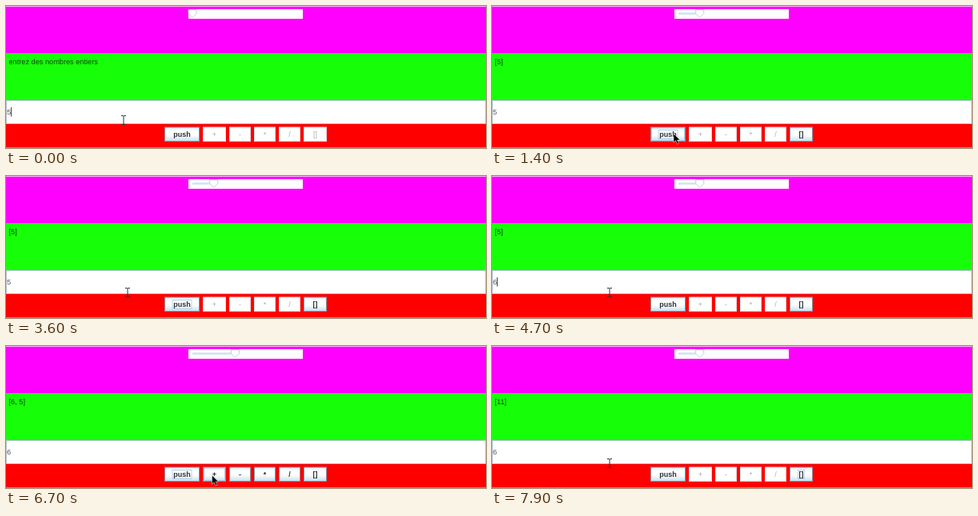
Recreate the animation shown at these times as an HTML page. Size 600 px wide and 178 px high, loop 8 s.

```html
<!DOCTYPE html>
<html lang="fr">
<head>
<meta charset="utf-8">
<title>Calculatrice à pile</title>
<style>
  html, body { margin: 0; width: 100%; height: 100%; overflow: hidden; background: #f00; }
  svg { display: block; width: 600px; height: 178px; }
  text { font-family: "Liberation Sans", Arial, sans-serif; }
  .stack { font-size: 9.2px; fill: #123f10; }
  .entry { font-size: 9.4px; fill: #555; }
  .btn text { font-size: 9px; font-weight: bold; fill: #2b333b; text-anchor: middle; }
  .btn .box { fill: url(#steel); stroke: #8796a5; }
  .btn .ring { fill: none; stroke: #b4cbe0; visibility: hidden; }
  .btn .focus { fill: none; stroke: #b3c8dd; stroke-width: .8; visibility: hidden; }
  .btn.off .box { fill: #fff; stroke: #e3dbe2; }
  .btn.off text { fill: #a9adb1; font-weight: normal; }
  .btn.hover .ring, .btn.focused .focus { visibility: visible; }
  .btn.down .box { fill: #cfe0ef; stroke: #71879c; }
</style>
</head>
<body>
<svg viewBox="0 0 600 178">
  <defs>
    <linearGradient id="steel" x2="0" y2="1">
      <stop offset="0" stop-color="#e6eef6"/>
      <stop offset=".3" stop-color="#fff"/>
      <stop offset=".55" stop-color="#fff"/>
      <stop offset="1" stop-color="#cbdceb"/>
    </linearGradient>
  </defs>
  <rect width="600" height="59" fill="#f0f"/>
  <rect width="600" height="1" fill="#f5b5f3"/>
  <rect y="59" width="600" height="60" fill="#16ff08"/>
  <rect y="148" width="600" height="30" fill="#f00"/>
  <rect y="177" width="600" height="1" fill="#f66"/>

  <rect x="228" y="4" width="143" height="12" fill="#fff"/>
  <path d="M233 9.5H366" stroke="#fafbfd" stroke-width="2"/>
  <path id="track" stroke="#cfe2f2" stroke-width="2.4"/>
  <path id="thumb" d="M-5 4.5H5V9.5L0 14.5L-5 9.5Z" fill="#fff" stroke="#bccad7" stroke-width=".9"/>

  <text id="stack" class="stack" x="3.5" y="72.5"></text>

  <rect x=".5" y="118.5" width="599" height="29" fill="#fff" stroke="#b3c1ce"/>
  <text id="entry" class="entry" x="1" y="136.3"></text>
  <path id="caret" d="M.5 127V138.5" stroke="#444"/>

  <g id="buttons"></g>

  <path id="arrow" d="M0 0V11L2.6 8.7L4.6 13.2L6.5 12.3L4.6 8.1H8Z" fill="#000" stroke="#fff" stroke-width=".5"/>
  <path id="beam" d="M-3 -5.5H-1L0 -4.7L1 -5.5H3M0 -4.7V4.7M-3 5.5H-1L0 4.7L1 5.5H3" fill="none" stroke="#333"/>
</svg>
<script>
const LOOP = 8000;
const $ = id => document.getElementById(id);

// label, left edge, width, stack size needed to enable it
const buttons = [
  ["push", 198, 44, 0], ["+", 246, 29, 2], ["-", 279, 27, 2],
  ["*", 310, 27, 2], ["/", 341, 27, 2], ["[]", 372, 29, 1]
].map(([label, x, w, need]) => {
  const mid = x + w / 2;
  const half = label === "push" ? 12 : 4;
  $("buttons").insertAdjacentHTML("beforeend", `<g class="btn">
    <rect class="box" x="${x + .5}" y="152" width="${w - 1}" height="17.5"/>
    <rect class="ring" x="${x + 1.5}" y="153" width="${w - 3}" height="15.5"/>
    <rect class="focus" x="${mid - half}" y="155.5" width="${2 * half}" height="11"/>
    <text x="${mid}" y="164.3">${label}</text></g>`);
  return { label, x, w, need, node: $("buttons").lastElementChild };
});

// Each step changes part of the state and holds until the next one
const steps = [
  [0, { x: 147, y: 143, entry: "5", stack: [], caret: true, focus: "entry", down: "" }],
  [500, { x: 158, y: 145, caret: false }],
  [600, { x: 184, y: 152 }],
  [700, { x: 216, y: 160 }],
  [800, { x: 249, y: 164 }],
  [900, { x: 238, y: 162 }],
  [1000, { x: 227, y: 160, caret: true }],
  [1200, { caret: false, focus: "push", down: "push" }],
  [1300, { stack: [5] }],
  [1400, { down: "" }],
  [3300, { x: 220, y: 159 }],
  [3400, { x: 200, y: 155 }],
  [3500, { x: 172, y: 149 }],
  [3600, { x: 152, y: 146 }],
  [3700, { x: 147, y: 146, focus: "entry", caret: true }],
  [3900, { entry: "" }],
  [4000, { entry: "6" }],
  [4400, { caret: false }],
  [4700, { caret: true }],
  [5000, { x: 219, y: 150 }],
  [5200, { x: 226, y: 156, caret: false }],
  [5300, { x: 231, y: 161 }],
  [5400, { x: 231, y: 163 }],
  [5500, { x: 229, y: 162 }],
  [5600, { focus: "push", down: "push" }],
  [5800, { down: "", stack: [6, 5] }],
  [6400, { x: 236, y: 163 }],
  [6500, { x: 247, y: 163 }],
  [6600, { x: 255, y: 162 }],
  [6700, { x: 257.5, y: 162 }],
  [6800, { focus: "+", down: "+" }],
  [7000, { stack: [11], focus: "[]" }],
  [7100, { down: "" }],
  [7700, { x: 236, y: 159 }],
  [7800, { x: 184, y: 151 }],
  [7900, { x: 147, y: 147 }]
];
let last = {};
const states = steps.map(([at, change]) => last = { ...last, ...change, at });

const place = (id, x, y) => $(id).setAttribute("transform", `translate(${x} ${y})`);
const show = (id, on) => $(id).style.visibility = on ? "visible" : "hidden";

function draw(s) {
  const size = s.stack.length;
  const knob = 233 + size * 26.7;
  place("thumb", knob, 0);
  $("track").setAttribute("d", `M233 9.5H${knob - 5 * (size > 0)}`);
  $("stack").textContent = size ? `[${s.stack.join(", ")}]` : "entrez des nombres entiers";
  $("entry").textContent = s.entry;
  place("caret", s.entry ? 6 : 1, 0);
  show("caret", s.caret);

  for (const { label, x, w, need, node } of buttons) {
    const on = size >= need;
    const over = s.x >= x && s.x < x + w && s.y >= 152 && s.y < 170;
    node.classList.toggle("off", !on);
    node.classList.toggle("hover", on && over);
    node.classList.toggle("focused", on && s.focus === label);
    node.classList.toggle("down", on && s.down === label);
  }

  const inField = s.y < 148;
  show("beam", inField);
  show("arrow", !inField);
  place(inField ? "beam" : "arrow", s.x, s.y);
}

let shown;
function tick() {
  const t = performance.now() % LOOP;
  const now = states.findLast(s => s.at <= t);
  if (now !== shown) draw(shown = now);
  requestAnimationFrame(tick);
}
tick();
</script>
</body>
</html>
```
